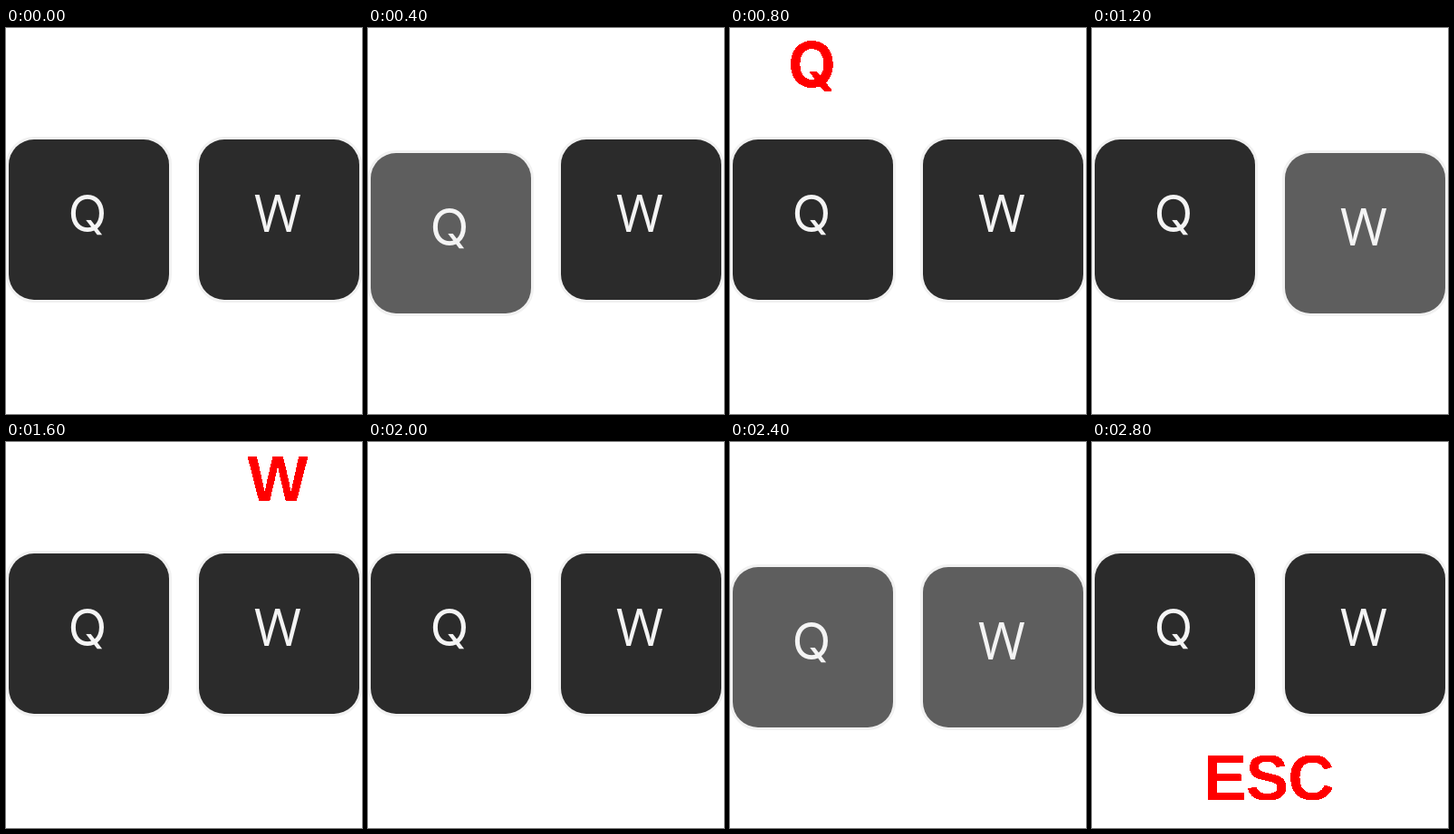
An HTML page that plays this animation: 393 px wide and 426 px high, repeating every 3200 ms.

```html
<!DOCTYPE html>
<html lang="en">
<head>
<meta charset="utf-8">
<title>Key presses</title>
<style>
  html, body { margin: 0; width: 100%; height: 100%; overflow: hidden; background: #fff; }
  svg { display: block; width: 393px; height: 426px; }
  text { text-anchor: middle; }

  .key, .output text { animation: 3200ms step-end infinite; }
  .key { fill: #2b2b2b; }
  .key rect { stroke: #f1f1f1; stroke-width: 6; paint-order: stroke; }
  .key text { fill: #f4f4f4; }
  .key-q { animation-name: press-q; }
  .key-w { animation-name: press-w; }
  .key-q text { font: 400 56px Inter, sans-serif; }
  .key-w text { font: 500 56px "Open Sans", "Noto Sans", sans-serif; }

  .output { fill: #f00; filter: url(#hard-edge); }
  .output text { opacity: 0; font: bold 71px "Liberation Sans", Arial, sans-serif; }
  .output .q { animation-name: show-q; font: 700 69px Inter, sans-serif; }
  .output .w { animation-name: show-w; }
  .output .esc { animation-name: show-esc; text-anchor: start; letter-spacing: -1px; }

  /* Eight beats of 400 ms, each 12.5% of the loop */
  @keyframes press-q {
    0%, 25%, 87.5%, 100% { transform: none; fill: #2b2b2b; }
    12.5%, 75% { transform: translateY(15px); fill: #5e5e5e; }
  }
  @keyframes press-w {
    0%, 50%, 87.5%, 100% { transform: none; fill: #2b2b2b; }
    37.5%, 75% { transform: translateY(15px); fill: #5e5e5e; }
  }
  @keyframes show-q { 0%, 37.5%, 100% { opacity: 0; } 25% { opacity: 1; } }
  @keyframes show-w { 0%, 62.5%, 100% { opacity: 0; } 50% { opacity: 1; } }
  @keyframes show-esc { 0% { opacity: 0; } 87.5%, 100% { opacity: 1; } }
</style>
</head>
<body>
<svg viewBox="0 0 393 426">
  <filter id="hard-edge" filterUnits="userSpaceOnUse" x="0" y="0" width="393" height="426">
    <feComponentTransfer><feFuncA type="discrete" tableValues="0 1"/></feComponentTransfer>
  </filter>
  <g class="key key-q">
    <rect x="3" y="123" width="177" height="177" rx="28"/>
    <text x="90" y="225">Q</text>
  </g>
  <g class="key key-w">
    <rect x="213" y="123" width="177" height="177" rx="28"/>
    <text x="300" y="225">W</text>
  </g>
  <g class="output">
    <text class="q" x="90.5" y="65">Q</text>
    <text class="w" x="300" y="65">W</text>
    <text class="esc" x="123.5" y="395">ESC</text>
  </g>
</svg>
</body>
</html>
```
